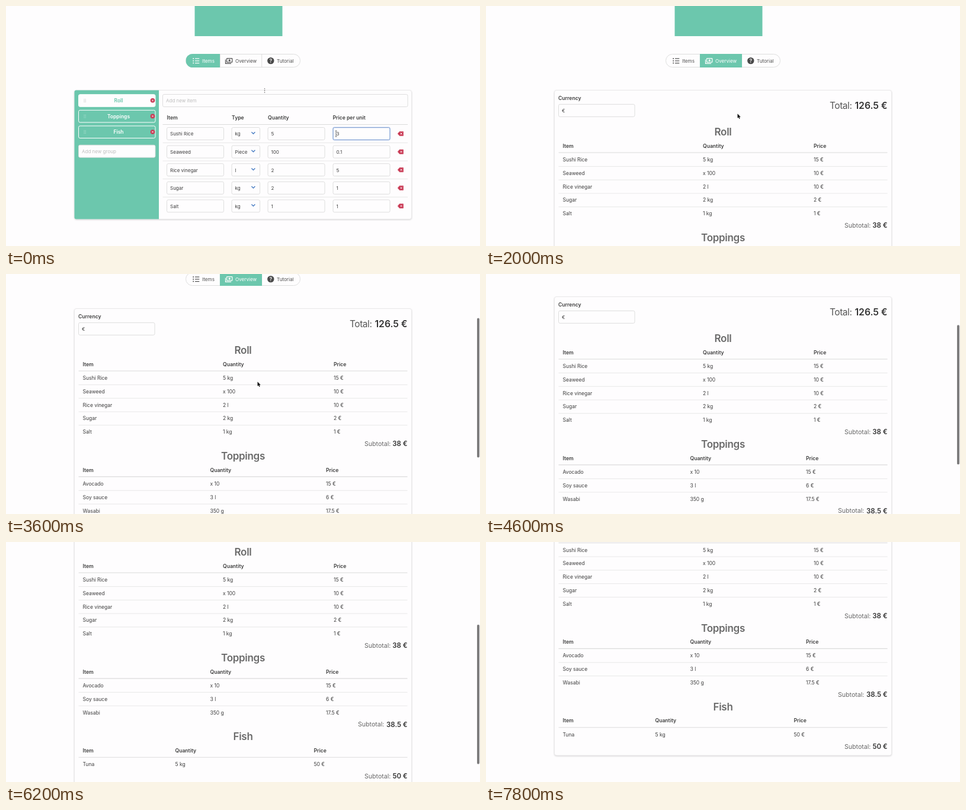
An HTML page that plays this animation: 800x406 px, repeating every 8000 ms.

```html
<!DOCTYPE html>
<html lang="en">
<head>
<meta charset="utf-8">
<title>Recipe costs</title>
<style>
  html, body { margin: 0; height: 100%; overflow: hidden; background: #fefdfe; }
  svg { display: block; width: 800px; height: 406px; }
  text { font-family: Inter, "Open Sans", sans-serif; white-space: pre; }
  .card { fill: #fefdfe; stroke: #e9e8e9; filter: drop-shadow(0 1px 1px rgba(10, 10, 10, .16)); }
</style>
</head>
<body>
<svg id="stage" viewBox="0 0 800 406"></svg>
<script>
const GREEN = '#6cc7ad', INK = '#3d3d3d', GREY = '#dbdbdb', RED = '#c93a55', PAPER = '#fefdfe';
const STEP = 200, LOOP = 8000;

const groups = [
  { name: 'Roll', cols: [129.5, 366, 553], sum: '38 €', sumX: 652.5, labelX: 605, rows: [
    ['Sushi Rice', '5 kg', '15 €'], ['Seaweed', 'x 100', '10 €'], ['Rice vinegar', '2 l', '10 €'],
    ['Sugar', '2 kg', '2 €'], ['Salt', '1 kg', '1 €']] },
  { name: 'Toppings', cols: [129.5, 344.5, 540], sum: '38.5 €', sumX: 642, labelX: 594, rows: [
    ['Avocado', 'x 10', '15 €'], ['Soy sauce', '3 l', '6 €'], ['Wasabi', '350 g', '17.5 €']] },
  { name: 'Fish', cols: [129.5, 285.5, 519.5], sum: '50 €', sumX: 652.5, labelX: 605, rows: [
    ['Tuna', '5 kg', '50 €']] }
];
const items = [['Sushi Rice', 'kg', 5, 3], ['Seaweed', 'Piece', 100, 0.1], ['Rice vinegar', 'l', 2, 5],
  ['Sugar', 'kg', 2, 1], ['Salt', 'kg', 1, 1]];

// time, value(s)
const scrollKeys = [[2800, 0], [3000, 4.5], [3200, 40], [3400, 68], [3600, 84], [4000, 95], [4200, 95],
  [4400, 97], [4600, 104], [4800, 135], [5000, 161], [5200, 176], [5400, 183], [5600, 184.5], [5800, 184.5],
  [6000, 188], [6200, 196], [6400, 215], [6600, 230], [6800, 238], [7000, 242], [7400, 246], [7600, 246],
  [7800, 246.5]];
const cursorKeys = [[0, 557, 216], [600, 404, 92], [1800, 404, 92], [2000, 424.5, 182.3]];

// Linear interpolation between keys
function at(keys, t, i = 1) {
  const n = keys.findIndex(k => k[0] > t);
  if (n < 0) return keys[keys.length - 1][i];
  if (n === 0) return keys[0][i];
  const a = keys[n - 1], b = keys[n];
  return a[i] + (b[i] - a[i]) * (t - a[0]) / (b[0] - a[0]);
}

// y is the middle of the capitals
const text = (x, y, s, size = 8.5, fill = INK, more = '') =>
  `<text x="${x}" y="${y + size * .364}" font-size="${size}" fill="${fill}" ${more}>${s}</text>`;
const bold = (x, y, s, size = 8.6, fill = INK, more = '') =>
  text(x, y, s, size, fill, 'font-weight="600" ' + more);
const rect = (x, y, w, h, r, fill, stroke = 'none', more = '') =>
  `<rect x="${x}" y="${y}" width="${w}" height="${h}" rx="${r}" fill="${fill}" stroke="${stroke}" ${more}/>`;
const path = (d, stroke, width = 1, fill = 'none', more = '') =>
  `<path d="${d}" stroke="${stroke}" stroke-width="${width}" fill="${fill}" ${more}/>`;
const circle = (x, y, r, fill) => `<circle cx="${x}" cy="${y}" r="${r}" fill="${fill}"/>`;
const line = (x, y, w, color = '#e2e2e2', width = .8) => path(`M${x} ${y}h${w}`, color, width);
const cross = (x, y, r, color) => path(`M${x - r} ${y - r}l${2 * r} ${2 * r}m0 ${-2 * r}l${-2 * r} ${2 * r}`, color, .9);
const field = (x, y, w, s, color = INK) =>
  rect(x, y - 10.5, w, 21, 2.4, PAPER, GREY, 'stroke-width=".9"') + text(x + 5.5, y + .5, s, 8, color);

function tabs(active) {
  const edges = [303.5, 361, 432, 496.5], names = ['Items', 'Overview', 'Tutorial'];
  const ink = i => i === active ? '#fff' : '#505050';
  let out = `<clipPath id="pill">${rect(303.5, 81, 193, 23, 11.5, '#000')}</clipPath>` +
    rect(303.5, 81.5, 193, 22, 11, PAPER, GREY, 'stroke-width=".9"') +
    path('M361.3 81.5v22M431.7 81.5v22', GREY, .9) +
    rect(edges[active], 81, edges[active + 1] - edges[active], 23, 0, GREEN, 'none', 'clip-path="url(#pill)"');
  [331, 387, 457].forEach((x, i) => out += text(x, 93, names[i], 8.1, ink(i)));
  for (const y of [89, 92.8, 96.6])
    out += circle(316.2, y, 1, ink(0)) + line(319, y, 7.3, ink(0), 1.2);
  return out + rect(372.6, 88.6, 9.2, 6.6, .6, 'none', ink(1), 'stroke-width="1.2"') +
    circle(377.2, 91.9, 1.7, ink(1)) + path('M370.5 90.4v7h9.6', ink(1), 1.2) +
    circle(446.8, 92.6, 5.7, '#4a4a4a') + bold(446.8, 92.7, '?', 8.6, '#fff', 'text-anchor="middle"');
}

function itemsCard() {
  let out = rect(115.5, 142.5, 569, 218, 3.5, PAPER, 'none', 'class="card"') +
    path('M258 142.5H118.5q-3 0-3 3v212q0 3 3 3H258z', 'none', 0, GREEN);
  groups.forEach((g, i) => {
    const y = 160 + i * 26.6, on = i === 0;
    out += rect(122.5, y - 10.3, 129.5, 20.6, 2.4, on ? PAPER : 'none', '#fff') +
      bold(190, y, g.name, 8.5, on ? GREEN : '#fff', 'text-anchor="middle"');
    for (let d = 0; d < 6; d++)
      out += circle(132 + d % 2 * 2.2, y - 2.2 + (d >> 1) * 2.2, .65, on ? '#c4c4c4' : '#a9dfcf');
    out += circle(247.5, y - .2, 3.8, RED) + cross(247.5, y - .2, 1.3, '#fff');
  });
  out += field(122.5, 245.7, 129.5, 'Add new group', '#bdbdbd') +
    [140, 143.1, 146.2].map(y => circle(436.5, y, .8, '#666')).join('') +
    field(264.5, 160, 413.5, 'Add new item', '#bdbdbd');
  [[271.5, 'Item'], [381, 'Type'], [442, 'Quantity'], [551.5, 'Price per unit']]
    .forEach(([x, s]) => out += bold(x, 189, s));
  out += line(264.5, 200.5, 413.5, GREY, 1.1);
  items.forEach((row, i) => {
    const y = 216 + i * 30.6;
    [[271.5, 96], [381, 47.5], [442, 96], [552, 96]].forEach(([x, w], c) => out += field(x, y, w, row[c]));
    out += path(`M414.4 ${y - 2.8}l3 3 3-3`, '#4b7fc4', 1.4) +
      path(`M661.2 ${y}l3-3.6h6.3v7.2h-6.3z`, RED, .6, RED, 'stroke-linejoin="round"') + cross(667, y, 1.5, '#fff');
    if (i < 4) out += line(264.5, y + 15.4, 413.5);
  });
  return out + rect(552, 205.5, 96, 21, 2.4, 'none', '#dfe8f8', 'stroke-width="2.6"') +
    rect(552, 205.5, 96, 21, 2.4, 'none', '#7f9fd0');
}

function overviewCard() {
  let out = rect(115.5, 142.5, 569, 465, 3.5, PAPER, 'none', 'class="card"') +
    bold(122, 156, 'Currency') + field(122.5, 176.8, 128.5, '€') +
    text(580, 168.5, 'Total:', 15.4, '#555', 'letter-spacing="-.4"') +
    bold(677.5, 168.5, '126.5 €', 15.7, '#333', 'text-anchor="end"');
  let y = 213;
  for (const g of groups) {
    const n = g.rows.length, last = y + 47 + 22.8 * (n - 1);
    out += bold(400, y, g.name, 17, '#6a6a6a', 'text-anchor="middle" letter-spacing="-.3"') +
      line(122.5, y + 35, 555, GREY, 1.1);
    ['Item', 'Quantity', 'Price'].forEach((s, c) => out += bold(g.cols[c], y + 23.6, s));
    g.rows.forEach((row, i) => {
      const ry = y + 47 + 22.8 * i;
      row.forEach((s, c) => out += text(g.cols[c], ry, s));
      if (i < n - 1) out += line(122.5, ry + 11.4, 555);
    });
    out += text(g.labelX, last + 20, 'Subtotal:', 10.6, '#666') +
      bold(677.5, last + 20, g.sum, 11.4, '#333', 'text-anchor="end"');
    y += 64.9 + 22.8 * n;
  }
  return out;
}

function cursor(t) {
  if (t >= 4400) return '';
  const x = at(cursorKeys, t, 1), y = at(cursorKeys, t, 2);
  if (t < STEP) return path(`M${x} ${y - 5}v10m-1-10h2m-2 10h2`, '#444', .8);
  return path(`M${x} ${y}v7.4l1.7-1.5 1.2 2.7 1.3-.6-1.2-2.6h2.3z`, '#fff', .7, '#111', 'paint-order="stroke"');
}

function scene(t) {
  const s = at(scrollKeys, t), over = t >= 800;
  const leave = t === 800 ? 'opacity=".4" transform="translate(400 251.5) scale(1.12) translate(-400 -251.5)"' : '';
  const card = t < 1000 ? `<g ${leave}>${itemsCard()}</g>`
    : `<g opacity="${t < 1200 ? .5 : 1}">${overviewCard()}</g>`;
  const bar = t >= 3000 && t < 7800 ? rect(795, 25.6 + s * .583, 4, 236, 2, '#7d7c7d') : '';
  return `<g transform="translate(0 ${-s})">` + rect(318.5, -97, 148, 148, 0, GREEN) +
    tabs(over ? 1 : 0) + card + '</g>' + bar + cursor(t);
}

const stage = document.getElementById('stage');
let shown = -1;
function tick(now) {
  const t = Math.floor(now % LOOP / STEP) * STEP;
  if (t !== shown) stage.innerHTML = scene(shown = t);
  requestAnimationFrame(tick);
}
tick(performance.now());
</script>
</body>
</html>
```
